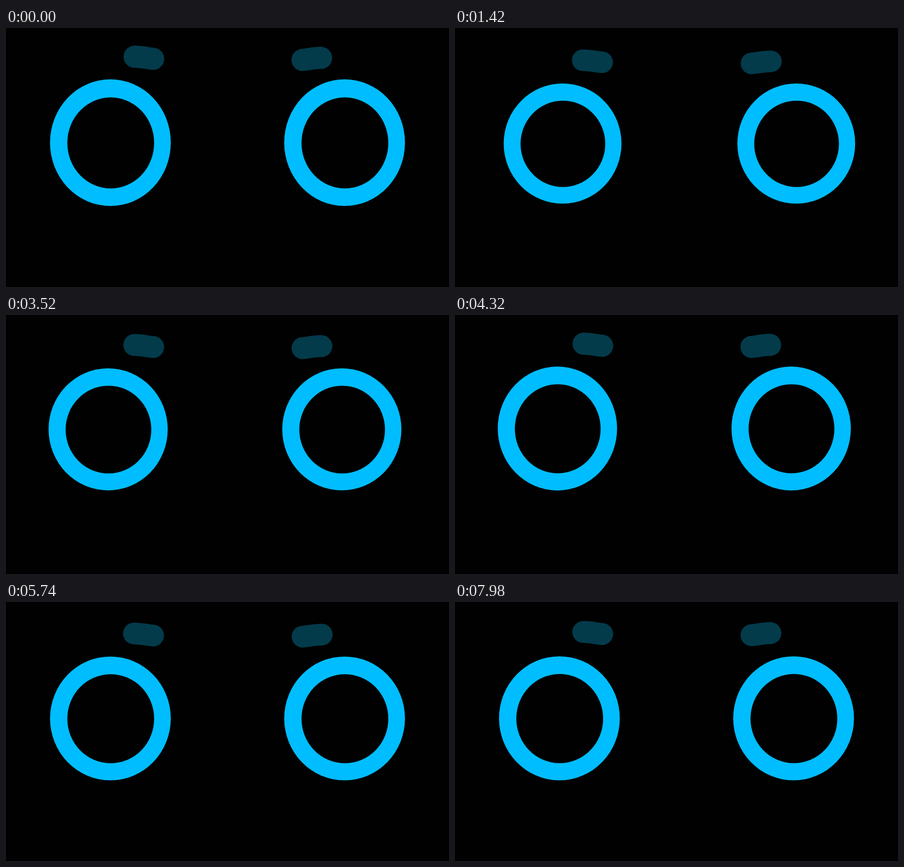
Write an HTML page with a canvas that moves like this. It is 978x573 px and loops after 8000 ms.

```html
<!DOCTYPE html>
<html lang="en">
<head>
<meta charset="utf-8">
<title>Glowing eyes</title>
<style>
  html, body { margin: 0; width: 100%; height: 100%; overflow: hidden; background: #000100; }
  canvas { display: block; width: 978px; height: 573px; }
</style>
</head>
<body>
<canvas id="stage" width="978" height="573"></canvas>
<script>
const LOOP = 8000;
const BACKGROUND = '#000100';
const RING = '#00bdff';
const BROW = '#033b4b';
const BROW_TOP = 39.1;
const MIRROR = 979.5;
const BOB_TURNS = [0, 2050, 4320, 6780, 8640]; // alternately raised and lowered
const GLANCE = 360;
const ctx = document.getElementById('stage').getContext('2d');

const ease = u => (1 - Math.cos(Math.PI * Math.min(1, Math.max(0, u)))) / 2;
const glance = (t, start) => ease((t - start) / GLANCE);

// 0 when the face is raised, 1 when it is lowered.
function lowered(t) {
  return BOB_TURNS.slice(1).reduce((sum, end, i) => {
    const start = BOB_TURNS[i];
    return sum + (i % 2 ? -1 : 1) * ease((t - start) / (end - start));
  }, 0);
}

function drawEye(x, y, rx, ry) {
  const hole = 0.719;
  ctx.fillStyle = RING;
  ctx.beginPath();
  ctx.ellipse(x, y, rx, ry, 0, 0, Math.PI * 2);
  ctx.ellipse(x + 0.7, y + 0.6, rx * hole, ry * hole, 0, 0, Math.PI * 2);
  ctx.fill('evenodd');
}

function drawBrow(low, mirrored) {
  const width = 49 - 1.6 * low;
  const x = 284 - 2.5 * low;
  const y = BROW_TOP + 10.6 * low + width / 2;
  ctx.save();
  if (mirrored) {
    ctx.translate(MIRROR, 2.5);
    ctx.scale(-1, 1);
  }
  ctx.strokeStyle = BROW;
  ctx.lineWidth = width;
  ctx.lineCap = 'round';
  ctx.beginPath();
  ctx.moveTo(x, y);
  ctx.bezierCurveTo(x + 16, y, 312, y + 3.5, 324.8, y + 4.5);
  ctx.stroke();
  ctx.restore();
}

function draw(t) {
  // Look right, then left, then back to the middle.
  const right = glance(t, 400), left = glance(t, 1780), back = glance(t, 4240);
  const gaze = 7 * right - 12 * left + 5 * back;
  const aside = right - back;

  const browLow = lowered(t);
  const eyeLow = lowered(t * 0.97); // the eyes trail the brows a little

  const top = 113.5 + 0.5 * aside + (14 - 2.5 * aside) * eyeLow;
  const bottom = 393.8 + 1.6 * eyeLow - 6.4 * aside;
  const x = 230.5 + gaze;
  const y = (top + bottom) / 2;
  const rx = 133.3 - 2.4 * aside - 0.125 * gaze;
  const ry = (bottom - top) / 2;

  ctx.fillStyle = BACKGROUND;
  ctx.fillRect(0, 0, 978, 573);
  drawBrow(browLow, false);
  drawBrow(browLow, true);
  drawEye(x, y, rx, ry);
  drawEye(x + 517 - 1.1 * aside, y, rx, ry);
}

function tick() {
  draw(performance.now() % LOOP);
  requestAnimationFrame(tick);
}
tick();
</script>
</body>
</html>
```
